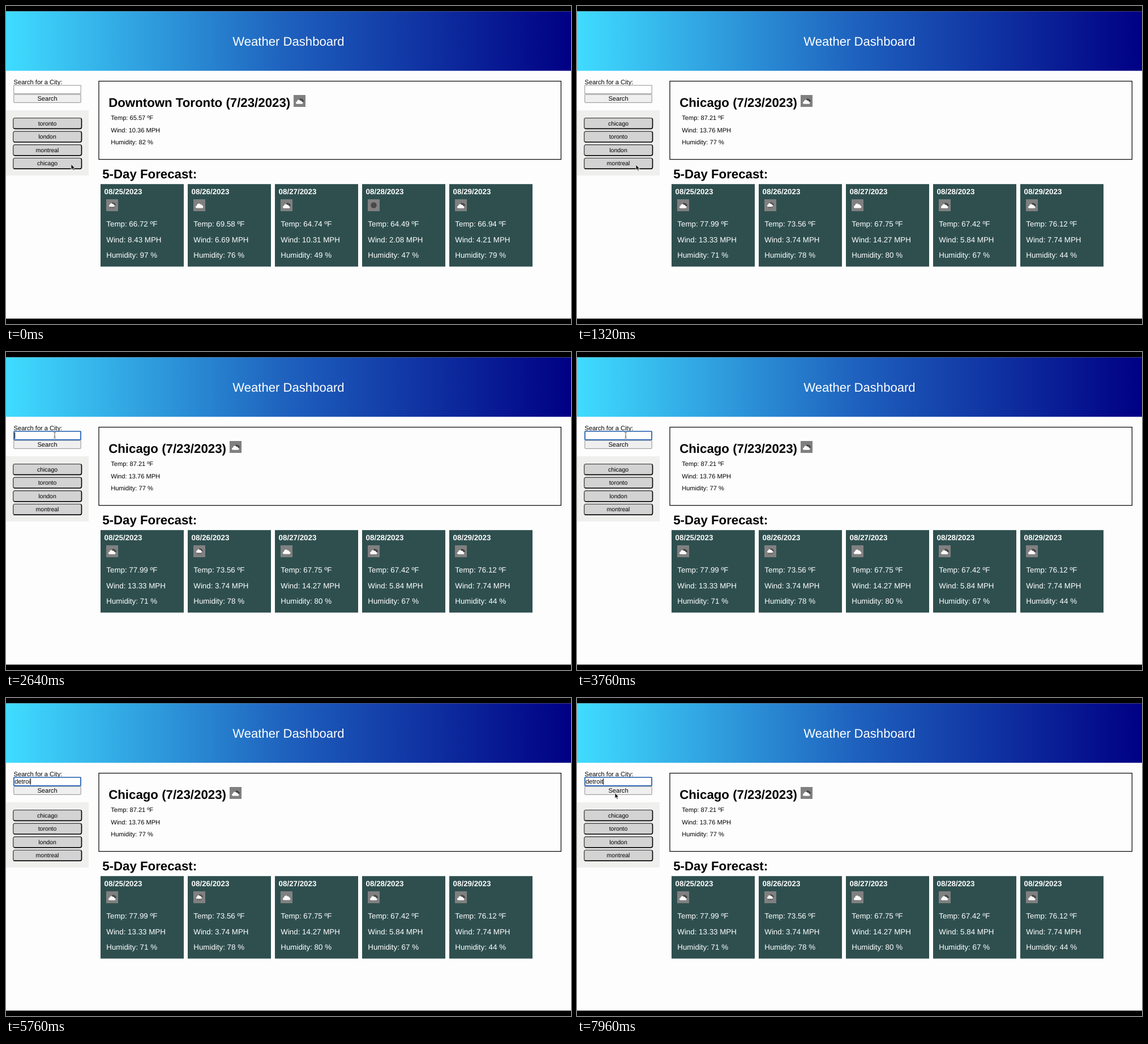
An HTML page that plays this animation: 998x561 px, repeating every 8000 ms.

```html
<!DOCTYPE html>
<html lang="en">
<head>
<meta charset="utf-8">
<title>Weather Dashboard</title>
<style>
html, body { margin: 0; width: 100%; height: 100%; overflow: hidden; background: #000; }
svg { display: block; width: 100%; height: 100%; }
text { font-family: "Liberation Sans", Arial, sans-serif; font-size: 11.1px; white-space: pre; text-rendering: geometricPrecision; }
.h { font-size: 22.25px; font-weight: bold; }
.card { font-size: 13.35px; fill: #fff; }
.b { font-weight: bold; }
.mid { text-anchor: middle; }
</style>
</head>
<body>
<svg id="stage" viewBox="0 0 998 561" preserveAspectRatio="none">
  <defs>
    <linearGradient id="sky">
      <stop offset="0" stop-color="#40dcff"/>
      <stop offset=".5" stop-color="#1e60bd"/>
      <stop offset="1" stop-color="#000084"/>
    </linearGradient>
    <path id="puff" d="M2.4 9.5C-.6 9.5-.6 5.4 2.2 5.2C2.2 1.4 7 .2 8.6 3.1C10.4 2.4 11.6 3.6 11.5 5C14.3 5.2 14.2 9.5 11.6 9.5Z"/>
    <g id="cloud">
      <rect width="21" height="21" fill="#808080"/>
      <use href="#puff" x="3.8" y="6" fill="#fafafa"/>
    </g>
    <g id="broken">
      <rect width="21" height="21" fill="#808080"/>
      <use href="#puff" transform="translate(8.2 5.2) scale(.72)" fill="#454545"/>
      <use href="#puff" transform="translate(3.8 7) scale(.93)" fill="#fafafa"/>
    </g>
    <g id="rain">
      <rect width="21" height="21" fill="#808080"/>
      <use href="#puff" transform="translate(8 4.6) scale(.64)" fill="#454545"/>
      <use href="#puff" transform="translate(4.8 5.8) scale(.75)" fill="#fafafa"/>
      <path d="M8 14l-.8 2M11 14l-.8 2M13.6 14l-.8 2" stroke="#4a4a4a"/>
    </g>
    <g id="clear">
      <rect width="21" height="21" fill="#808080"/>
      <circle cx="10.5" cy="10.5" r="5.2" fill="#484848"/>
    </g>
  </defs>
  <rect width="998" height="561"/>
  <rect y="9.5" width="998" height="542" fill="#fdfdfd"/>
  <rect y="9.5" width="998" height="104.8" fill="url(#sky)"/>
  <text x="499" y="69.8" class="mid" fill="#fff" style="font-size:22.1px">Weather Dashboard</text>

  <text x="13.6" y="137.8">Search for a City:</text>
  <rect x="13.8" y="140" width="118.4" height="14.8" fill="#fff" stroke="#858585" stroke-width=".9"/>
  <rect x="13.8" y="156" width="118.4" height="14.4" rx="1" fill="#efeff0" stroke="#858585" stroke-width=".9"/>
  <text x="73" y="167.1" class="mid">Search</text>
  <rect id="focus" x="14" y="140" width="118" height="14.8" rx="1" fill="#fff" stroke="#2362b4" stroke-width="1.7"/>
  <text id="typed" x="15.2" y="151.2"></text>
  <rect id="caret" y="142" width="1" height="11"/>

  <rect y="184" width="146" height="115" fill="#efefee"/>
  <g id="history"></g>
  <rect x="164" y="132.6" width="816.4" height="138" fill="none" stroke="#111" stroke-width="1.3"/>
  <text x="170.2" y="304" class="h">5-Day Forecast:</text>
  <g id="report"></g>

  <path id="arrow" d="M0 0V9.4L2.2 7.5L3.7 10.9L5.3 10.2L3.9 7H6.7Z" fill="#111" stroke="#fff" stroke-width=".7"/>
  <path id="beam" d="M-2.2-5.4Q0-5.4 0-3.8Q0-5.4 2.2-5.4M0-3.8V3.8M-2.2 5.4Q0 5.4 0 3.8Q0 5.4 2.2 5.4M-1.2 1.6H1.2" fill="none" stroke="#555" stroke-width=".9"/>
</svg>
<script>
const LOOP = 8000, LOAD = 1200, FOCUS = 2200, HIDE = 4920, SHOW = 7280;
const $ = id => document.getElementById(id);

const pages = [
  {
    cities: ['toronto', 'london', 'montreal', 'chicago'],
    title: 'Downtown Toronto', iconX: 508, icon: 'broken', now: ['65.57', '10.36', 82],
    days: [['rain', '66.72', '8.43', 97], ['cloud', '69.58', '6.69', 76], ['broken', '64.74', '10.31', 49],
           ['clear', '64.49', '2.08', 47], ['broken', '66.94', '4.21', 79]]
  },
  {
    cities: ['chicago', 'toronto', 'london', 'montreal'],
    title: 'Chicago', iconX: 395, icon: 'broken', now: ['87.21', '13.76', 77],
    days: [['broken', '77.99', '13.33', 71], ['rain', '73.56', '3.74', 78], ['cloud', '67.75', '14.27', 80],
           ['broken', '67.42', '5.84', 67], ['broken', '76.12', '7.74', 44]]
  }
];

// [time, x, y] of the pointer
const route = [[0, 115, 279], [500, 104, 280], [1380, 104, 280], [1680, 95, 203], [1900, 95, 203],
               [2160, 86, 147], [SHOW, 86, 147], [7540, 69, 173], [7800, 67, 167.5], [LOOP, 67, 167.5]];

const word = 'detroit';
const keyTimes = [4920, 5120, 5280, 5400, 5560, 5680, 5920];

const text = (x, y, cls, s) => `<text x="${x}" y="${y}" class="${cls}">${s}</text>`;
const icon = (name, x, y) => `<use href="#${name}" x="${x}" y="${y}"/>`;

const rows = (x, y, step, cls, [temp, wind, wet]) =>
  [`Temp: ${temp} ºF`, `Wind: ${wind} MPH`, `Humidity: ${wet} %`]
    .map((s, i) => text(x, y + i * step, cls, s)).join('');

function cityButton(name, i) {
  return `<g transform="translate(12 ${196.9 + i * 23.6})">
    <rect x=".7" y=".7" width="120.8" height="18.9" rx="3" fill="#d3d3d3" stroke="#4c4c4c" stroke-width="1.4"/>
    <path d="M1.6 18.8Q2.4 19.6 3.7 19.6H118.5Q121.5 19.6 121.5 16.6V3.7Q121.5 2 120.6 1.4" fill="none" stroke="#000" stroke-width="1.4"/>
    <text x="61" y="13.7" class="mid" style="font-size:10.5px">${name}</text></g>`;
}

function dayCard([name, ...values], i) {
  const x = 167 + i * 154;
  return `<rect x="${x}" y="314.2" width="147" height="145.5" fill="#2f4f4f"/>`
    + text(x + 6.6, 332.2, 'card b', `08/${25 + i}/2023`)
    + icon(name, x + 10, 341)
    + rows(x + 10.3, 389.2, 27.3, 'card', values);
}

function showPage(p) {
  $('history').innerHTML = p.cities.map(cityButton).join('');
  $('report').innerHTML = text(181.2, 178, 'h', `${p.title} (7/23/2023)`)
    + icon(p.icon, p.iconX, 157)
    + rows(185.2, 201.2, 21.5, '', p.now)
    + p.days.map(dayCard).join('');
}

function pointer(t) {
  const i = Math.max(1, route.findIndex(k => k[0] > t));
  const [t0, x0, y0] = route[i - 1], [t1, x1, y1] = route[i];
  const u = (t - t0) / (t1 - t0), e = u * u * (3 - 2 * u);
  return [x0 + (x1 - x0) * e, y0 + (y1 - y0) * e];
}

const show = (id, on) => $(id).setAttribute('visibility', on ? 'visible' : 'hidden');

let current;
function draw(t) {
  const page = pages[t < LOAD ? 0 : 1];
  if (page !== current) showPage(current = page);

  const count = keyTimes.filter(k => k <= t).length;
  const typed = word.slice(0, count);
  const label = $('typed');
  if (label.textContent !== typed) label.textContent = typed;
  const since = t - (count ? keyTimes[count - 1] : FOCUS);
  $('caret').setAttribute('x', 15.2 + (count ? label.getComputedTextLength() : 0));
  show('focus', t >= FOCUS);
  show('caret', t >= FOCUS && since % 1000 < 500);

  const [x, y] = pointer(t);
  const inField = y > 140 && y < 155;
  const visible = t < HIDE || t >= SHOW;
  for (const id of ['arrow', 'beam']) {
    $(id).setAttribute('transform', `translate(${x} ${y})`);
    show(id, visible && inField === (id === 'beam'));
  }
}

const start = performance.now();
function tick() {
  draw((performance.now() - start) % LOOP);
  requestAnimationFrame(tick);
}
tick();
</script>
</body>
</html>
```
